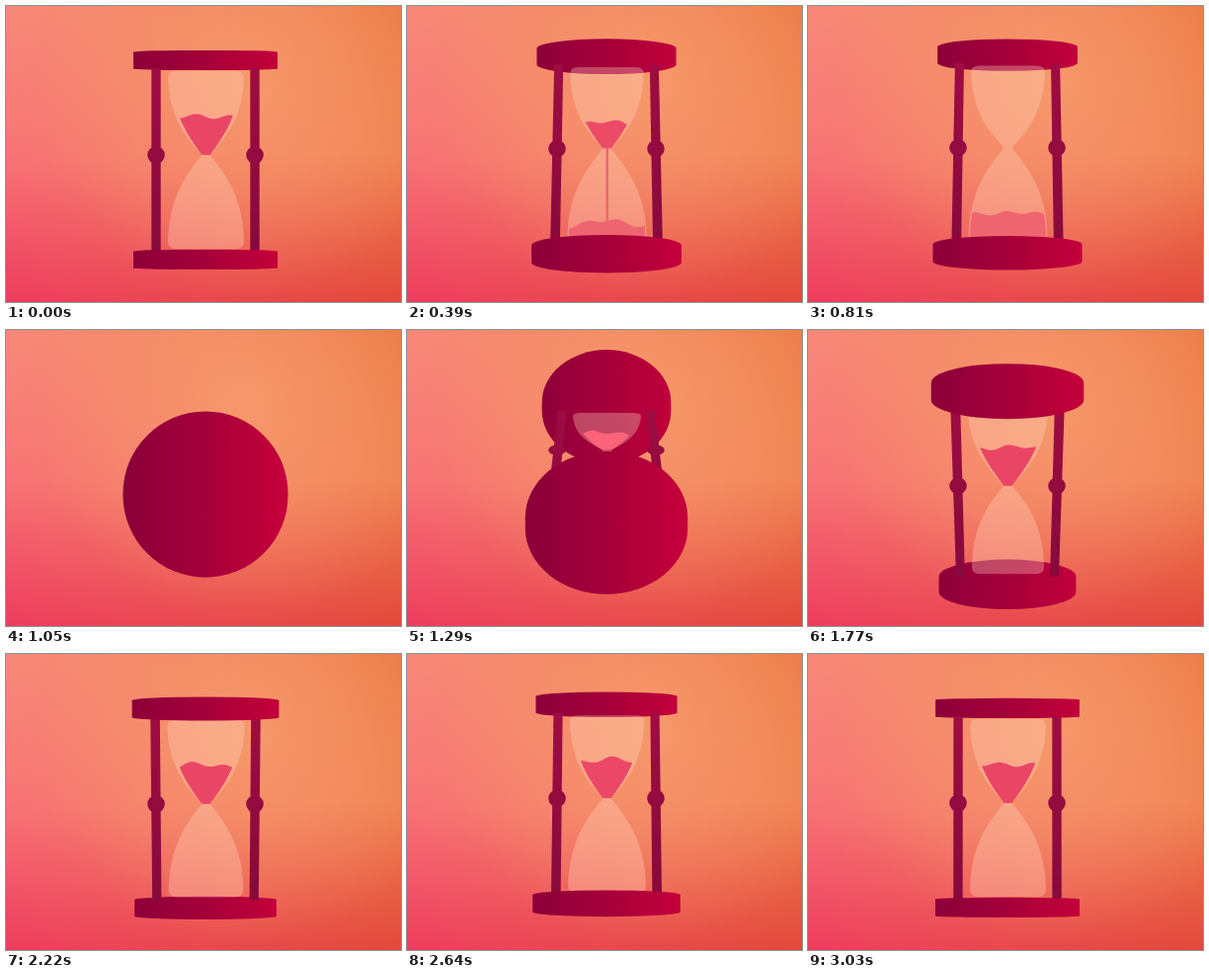
Recreate the animation shown at these times as an HTML page with a canvas. Size 400 by 300 pixels, loop 3060 ms.

```html
<!DOCTYPE html>
<html lang="en">
<head>
<meta charset="utf-8">
<title>Hourglass</title>
<style>
html, body { margin: 0; width: 100%; height: 100%; overflow: hidden; background: #f2806a; }
canvas { display: block; width: 100vw; height: 100vh; }
</style>
</head>
<body>
<canvas id="stage" width="400" height="300"></canvas>
<script>
const W = 400, H = 300, LOOP = 3060, CX = 202;
const ctx = document.getElementById('stage').getContext('2d');

// time, flip angle in degrees, height of the middle
const POSES = [
  [0, 0, 156], [550, -10, 150], [810, -6.5, 150], [950, 45, 162],
  [1050, 95, 157.5], [1290, 125.5, 136.5], [1420, 147, 138],
  [1770, 194.5, 160], [2220, 182.6, 156.5], [2450, 174.5, 150.5],
  [2730, 177.5, 153], [LOOP, 180, 156]
];

const lerp = (a, b, k) => a + (b - a) * k;
const clamp = v => Math.max(0, Math.min(1, v));
const mix = (a, b, k) => `rgb(${a.map((v, i) => Math.round(lerp(v, b[i], k)))})`;

// Monotone cubic through the poses: it rests at each turning point
function slope(i, col) {
  if (i <= 0 || i >= POSES.length - 1) return 0;
  const [p, q, r] = [POSES[i - 1], POSES[i], POSES[i + 1]];
  const a = (q[col] - p[col]) / (q[0] - p[0]);
  const b = (r[col] - q[col]) / (r[0] - q[0]);
  return a * b <= 0 ? 0 : 2 * a * b / (a + b);
}

function track(t, col) {
  let i = 0;
  while (i < POSES.length - 2 && t >= POSES[i + 1][0]) i++;
  const [p, q] = [POSES[i], POSES[i + 1]];
  const d = q[0] - p[0], k = (t - p[0]) / d, k2 = k * k, k3 = k2 * k;
  return (2 * k3 - 3 * k2 + 1) * p[col] + (k3 - 2 * k2 + k) * d * slope(i, col)
    + (3 * k2 - 2 * k3) * q[col] + (k3 - k2) * d * slope(i + 1, col);
}

function ramp(c, x0, y0, x1, y1, ...stops) {
  const g = c.createLinearGradient(x0, y0, x1, y1);
  stops.forEach((s, i) => g.addColorStop(i / (stops.length - 1), s));
  return g;
}

function layer() {
  const c = document.createElement('canvas');
  c.width = W;
  c.height = H;
  return c.getContext('2d');
}

function makeBackdrop() {
  const back = layer(), right = layer();
  const fill = (c, style) => { c.fillStyle = style; c.fillRect(0, 0, W, H); };
  fill(back, ramp(back, 20, 0, -20, H, '#f88a7a', '#f87477', '#ee3c5e'));
  fill(right, ramp(right, 0, 0, 0, H, '#ea7a44', '#ee8250', '#e2493b'));
  right.globalCompositeOperation = 'destination-in';
  fill(right, ramp(right, 0, 0, W, 0, 'rgba(0,0,0,0)', '#000'));
  back.drawImage(right.canvas, 0, 0);
  const glow = back.createRadialGradient(245, 80, 0, 245, 80, 215);
  glow.addColorStop(0, 'rgba(250,166,116,.62)');
  glow.addColorStop(1, 'rgba(250,166,116,0)');
  fill(back, glow);
  return back.canvas;
}

const backdrop = makeBackdrop();
const discPaint = ramp(ctx, 122, 0, 284, 0, '#8b0039', '#a50039', '#c7003b');
const rodPaint = ramp(ctx, 0, 60, 0, 250, '#a00c43', '#860a3c');

function makeDisc(mid, side, cos, depth) {
  const grow = Math.pow(Math.abs(depth), .65);
  const scale = depth > 0 ? 1 + .145 * grow : 1 - .12 * grow;
  const r = 73 * scale;
  return {
    y: mid + side * 101 * cos, depth, scale, r,
    ry: r * Math.max(Math.abs(depth), .022),
    half: 8.5 * Math.abs(cos) * scale
  };
}

function drawDisc(d) {
  ctx.fillStyle = discPaint;
  ctx.beginPath();
  ctx.ellipse(CX, d.y - d.half, d.r, d.ry, 0, Math.PI, 2 * Math.PI);
  ctx.ellipse(CX, d.y + d.half, d.r, d.ry, 0, 0, Math.PI);
  ctx.closePath();
  ctx.fill();
}

function drawRods(top, low, neck, cos) {
  const y0 = top.y + top.half, y1 = low.y - low.half;
  ctx.fillStyle = rodPaint;
  for (const s of [-1, 1]) {
    const x0 = CX + s * 50 * top.scale, x1 = CX + s * 50 * low.scale;
    ctx.beginPath();
    ctx.moveTo(x0 - 4.7 * top.scale, y0);
    ctx.lineTo(x0 + 4.7 * top.scale, y0);
    ctx.lineTo(x1 + 4.7 * low.scale, y1);
    ctx.lineTo(x1 - 4.7 * low.scale, y1);
    ctx.fill();
    ctx.beginPath();
    ctx.ellipse(CX + s * 50, neck, 8.8, 8.8 * Math.abs(cos), 0, 0, 2 * Math.PI);
    ctx.fill();
  }
}

// One half of the glass, from the neck to its disc
function bulb(neck, end, scale, inset) {
  const h = end - neck, wide = 38.5 * scale - inset;
  const x = w => CX + .5 + w, y = u => neck + u * h;
  ctx.beginPath();
  ctx.moveTo(x(-4), neck);
  ctx.bezierCurveTo(x(-24 + inset), y(.25), x(-wide + 1), y(.5), x(-wide), y(.92));
  ctx.quadraticCurveTo(x(-wide), end, x(-wide + 8), end);
  ctx.lineTo(x(wide - 8), end);
  ctx.quadraticCurveTo(x(wide), end, x(wide), y(.92));
  ctx.bezierCurveTo(x(wide - 1), y(.5), x(24 - inset), y(.25), x(4), neck);
  ctx.closePath();
}

function drawGlass(neck, end, scale) {
  bulb(neck, end, scale, 0);
  ctx.fillStyle = 'rgba(255,215,190,.33)';
  ctx.fill();
}

function drawSand(neck, end, scale, level, bottom, color, phase) {
  ctx.save();
  bulb(neck, end, scale, bottom === end ? 1.5 : 4);
  ctx.clip();
  ctx.fillStyle = color;
  ctx.beginPath();
  ctx.moveTo(CX - 45, bottom);
  for (let x = -45; x <= 45; x += 3) {
    const wave = 2 * Math.sin(x * .19 + phase) + 1.3 * Math.sin(x * .1 - phase + 1);
    ctx.lineTo(CX + x, level + wave + x * x * .003);
  }
  ctx.lineTo(CX + 45, bottom);
  ctx.fill();
  ctx.restore();
}

function draw(t) {
  const a = track(t, 1) * Math.PI / 180, mid = track(t, 2);
  const cos = Math.cos(a), sin = Math.sin(a);
  const first = makeDisc(mid, -1, cos, sin);
  const second = makeDisc(mid, 1, cos, -sin);
  const flipped = cos < 0;
  const [top, low] = flipped ? [second, first] : [first, second];
  const [near, far] = first.depth > 0 ? [first, second] : [second, first];
  const neck = mid - 5 - 12 * low.depth;
  const topEnd = top.y + 11 * Math.abs(cos), lowEnd = low.y - 11 * Math.abs(cos);
  const left = flipped ? 1 : 1 - clamp((t - 30) / 690);
  const phase = 2 * Math.PI * 3 * t / LOOP;
  const lowLevel = lowEnd - (lowEnd - neck) * .32 * Math.sqrt(1 - left);
  const lowColor = '#ee6570';

  ctx.drawImage(backdrop, 0, 0, W, H);
  drawDisc(far);
  drawRods(top, low, neck, cos);
  drawGlass(neck, topEnd, top.scale);
  drawGlass(neck, lowEnd, low.scale);

  if (left > 0) {
    const level = neck - (neck - topEnd) * .47 * Math.sqrt(left);
    const color = mix([233, 70, 101], [251, 100, 120], clamp(low.depth * 1.2));
    drawSand(neck, topEnd, top.scale, level, neck, color, phase);
  }
  if (left < 1) {
    if (left > 0) {
      ctx.fillStyle = lowColor;
      ctx.fillRect(CX - .5, neck - 1, 2.5, lowLevel - neck + 3);
    }
    drawSand(neck, lowEnd, low.scale, lowLevel, lowEnd, lowColor, phase);
  }
  drawDisc(near);
}

function tick() {
  draw(performance.now() % LOOP);
  requestAnimationFrame(tick);
}
tick();
</script>
</body>
</html>
```
